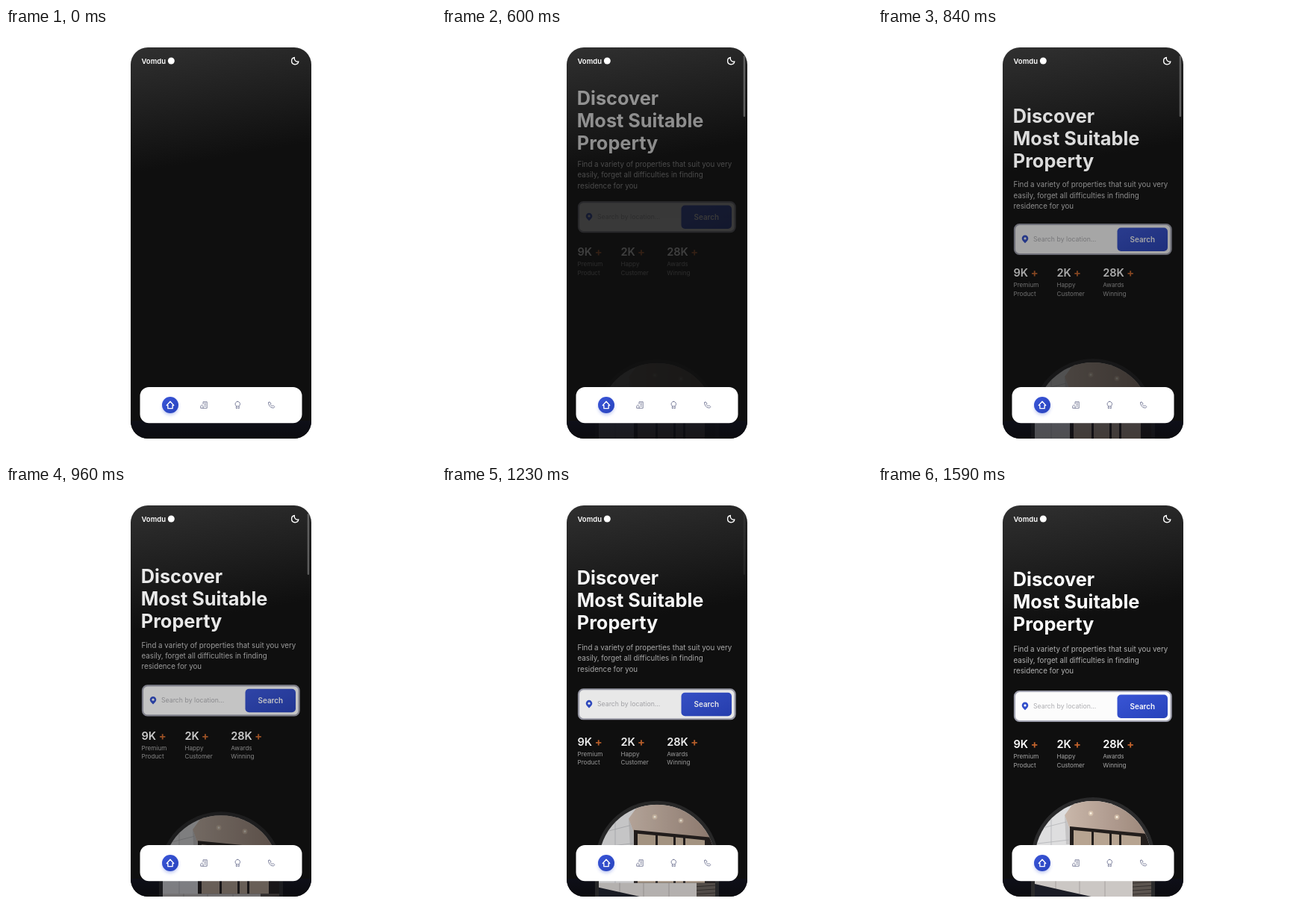
An HTML page for the animation above (1620 ms loop, 576 by 576 pixels).

```html
<!DOCTYPE html>
<html lang="en">
<head>
<meta charset="utf-8">
<title>Property app reveal</title>
<style>
  html, body { margin: 0; width: 100%; height: 100%; overflow: hidden; background: #fff; }
  svg { display: block; width: 100vw; height: 100vh; }
  text { font-family: Inter, "Open Sans", sans-serif; font-optical-sizing: none; }
  .bold { font-weight: 600; fill: #fff; }
  .head { font-size: 25.3px; font-weight: 700; }
  .sub { font-size: 9.75px; fill: #b3b3b3; }
  .num { font-size: 14.6px; }
  .plus { font-size: 14.6px; font-weight: 700; fill: #c4642c; }
  .cap { font-size: 8.15px; fill: #a6a6a6; }
  .icon { fill: none; stroke-width: 2; stroke-linejoin: round; stroke-linecap: round; }
</style>
</head>
<body>
<svg viewBox="0 0 576 576">
  <defs>
    <linearGradient id="back" gradientUnits="userSpaceOnUse" x1="167" y1="26" x2="196" y2="190">
      <stop offset="0" stop-color="#303030"/><stop offset="1" stop-color="#0f0f0f"/>
    </linearGradient>
    <linearGradient id="blue" x1="0" y1="0" x2="1" y2="1">
      <stop offset="0" stop-color="#3a56d8"/><stop offset="1" stop-color="#2843bd"/>
    </linearGradient>
    <linearGradient id="low" x1="0" y1="0" x2="0" y2="1">
      <stop offset="0" stop-color="#0e0f18"/><stop offset="1" stop-color="#0b0b0f"/>
    </linearGradient>
    <linearGradient id="soffit" x1="0" y1="0" x2="1" y2="0">
      <stop offset="0" stop-color="#cdbbae"/><stop offset="1" stop-color="#9c8578"/>
    </linearGradient>
    <filter id="glow" x="-50%" y="-50%" width="200%" height="200%"><feGaussianBlur stdDeviation="2.5"/></filter>
    <clipPath id="screen"><rect x="167" y="26" width="242" height="524" rx="23"/></clipPath>
    <clipPath id="dome"><path d="M210 570V500a78 78 0 0 1 156 0V570z"/></clipPath>
  </defs>

  <g clip-path="url(#screen)">
    <rect x="167" y="26" width="242" height="524" fill="url(#back)"/>
    <rect x="167" y="526" width="242" height="24" fill="url(#low)"/>

    <g id="arch">
      <path d="M205 570V500a83 83 0 0 1 166 0V570z" fill="#2b2b2c"/>
      <g clip-path="url(#dome)">
        <rect x="205" y="415" width="166" height="160" fill="#e3e3e4"/>
        <path d="M250 441L268 416H371V472L257 460z" fill="url(#soffit)"/>
        <path d="M250 441L257 460V480H252z" fill="#c9c8c9"/>
        <path d="M232 430V550M205 462L252 450M205 480L256 474" fill="none" stroke="#b6b8bc" stroke-width=".8"/>
        <path d="M257 456L371 467V575H257z" fill="#241f1d"/>
        <g id="panes" fill="#bba894"></g>
        <circle cx="285" cy="438.500" r="3.4" fill="#f5dfc4" opacity=".45"/>
        <circle cx="320" cy="443.500" r="3.4" fill="#f5dfc4" opacity=".45"/>
        <circle cx="285" cy="438.500" r="1.4" fill="#fff8e8"/>
        <circle cx="320" cy="443.500" r="1.4" fill="#fff8e8"/>
        <path d="M205 527H341V575H205z" fill="#cfcbc8"/>
        <path d="M238 527V546M270 527V550M304 527V550" stroke="#a29e9b" stroke-width=".8"/>
        <path d="M341 527H371V575H341z" fill="#5d5651"/>
        <path d="M341 532L371 530M341 537L371 535M341 542L371 540M341 547L371 545" stroke="#35302d"/>
        <path d="M205 532L290 551V575H205z" fill="#1c1e27"/>
      </g>
    </g>

    <g id="title" class="bold head">
      <text x="180.800" y="134">Discover</text>
      <text x="180.800" y="164">Most Suitable</text>
      <text x="180.800" y="194">Property</text>
    </g>

    <g id="lead" class="sub">
      <text x="181.5" y="222.3">Find a variety of properties that suit you very</text>
      <text x="181.5" y="236.8">easily, forget all difficulties in finding</text>
      <text x="181.5" y="251.2">residence for you</text>
    </g>

    <g id="search">
      <rect x="183" y="275" width="209.6" height="40" rx="6.500" fill="#fff" stroke="#a3a4b2" stroke-width="2.200"/>
      <path d="M197 300.3C194.5 297.6 192.7 296 192.7 293.9a4.3 4.3 0 0 1 8.6 0C201.3 296 199.5 297.6 197 300.3z" fill="#3350cf"/>
      <circle cx="197" cy="293.9" r="1.6" fill="#fff"/>
      <text x="208" y="297.8" font-size="8.75" fill="#b0b0b4">Search by location...</text>
      <rect x="320.5" y="279.5" width="67.5" height="31.5" rx="5" fill="url(#blue)"/>
      <text class="bold" x="354.3" y="298.7" font-size="9.9" text-anchor="middle">Search</text>
    </g>

    <g id="stats"></g>

    <rect id="bar" x="403.7" y="37" width="2.4" height="82" rx="1.2" fill="#6e6e6e"/>

    <text class="bold" x="181.5" y="47.8" font-size="9.5">Vomdu</text>
    <circle cx="221.3" cy="44" r="4.5" fill="#fff"/>
    <path class="icon" stroke="#fff" transform="translate(381.2 37.7) scale(.52)" style="stroke-width:2.6" d="M20.5 14A8.5 8.5 0 0 1 10 3.5 9 9 0 1 0 20.5 14z"/>

    <rect x="179.5" y="481" width="217" height="48.3" rx="12" fill="#fff"/>
    <circle cx="220" cy="508" r="10" fill="#3853d5" opacity=".4" filter="url(#glow)"/>
    <circle cx="220" cy="505" r="11" fill="url(#blue)"/>
    <g id="nav"></g>
  </g>
</svg>
<script>
  const LOOP = 1620, STEP = 30;
  const $ = id => document.getElementById(id);

  // Static repeats
  $('stats').innerHTML = [
    [181.5, '9K', 204.8, 'Premium', 'Product'],
    [239.5, '2K', 262, 'Happy', 'Customer'],
    [301.2, '28K', 333.3, 'Awards', 'Winning']
  ].map(([x, n, px, a, b]) =>
    `<text class="bold num" x="${x}" y="351.2">${n}</text>
     <text class="plus" x="${px}" y="351.2">+</text>
     <text class="cap" x="${x}" y="365.4">${a}</text>
     <text class="cap" x="${x}" y="376.6">${b}</text>`).join('');

  const icons = [
    [220, .52, 2.6, '#fff', 'M3 13L12 3L21 13H18V21H6V13z'],
    [265, .47, 2, '#777b98', 'M10 9V3H21V21H3V15L6.500 12L10 15V21M14 7H17M14 11H17M14 15H17'],
    [310.3, .47, 2, '#777b98', 'M12 2a7 7 0 1 0 .01 0zM8 15V22L12 20L16 22V15'],
    [355.5, .47, 2, '#777b98', 'M4 5L7 3L11 8L9 11Q11 14 14 15L17 13L21 17L19 20C11 22 2 13 4 5z']
  ];
  $('nav').innerHTML = icons.map(([x, s, w, c, d]) =>
    `<path class="icon" stroke="${c}" style="stroke-width:${w}" transform="translate(${x} 505) scale(${s}) translate(-12 -12)" d="${d}"/>`).join('');

  const paneTop = x => 461 + (x - 262) * .097;
  $('panes').innerHTML = [[262, 286], [289, 310], [313, 323], [326, 352]].map(([a, b]) =>
    `<path d="M${a} ${paneTop(a)}L${b} ${paneTop(b)}V527H${a}z"/>`).join('');

  // Smooth monotone curve through a few keys
  function curve(xs, ys, x) {
    const n = xs.length - 1;
    if (x <= xs[0]) return ys[0];
    if (x >= xs[n]) return ys[n];
    const slope = i => (ys[i + 1] - ys[i]) / (xs[i + 1] - xs[i]);
    const tangent = i => {
      if (i === 0) return 0;
      if (i === n) return slope(n - 1);
      const a = slope(i - 1), b = slope(i);
      return a * b <= 0 ? 0 : 2 * a * b / (a + b);
    };
    let i = 0;
    while (x > xs[i + 1]) i++;
    const w = xs[i + 1] - xs[i], u = (x - xs[i]) / w, v = 1 - u;
    return ys[i] * (1 + 2 * u) * v * v + tangent(i) * w * u * v * v
      + ys[i + 1] * u * u * (3 - 2 * u) - tangent(i + 1) * w * u * u * v;
  }

  const times = [210, 450, 690, 840, 1110, 1350, 1590];
  const parts = [
    { id: 'title', dy: [-60, -49, -20, -7, -2.5, -1, 0], op: [0, .22, .68, .85, .95, .98, 1] },
    { id: 'lead', dy: [-60, -52, -25, -9, -3.5, -1.5, 0], op: [0, .1, .55, .78, .92, .97, 1] },
    { id: 'search', dy: [-60, -54, -32, -12, -4.5, -1.5, 0], op: [0, .05, .29, .63, .86, .94, .99] },
    { id: 'stats', dy: [-60, -55, -38, -18, -6, -2, 0], op: [0, .05, .33, .65, .89, .95, 1] },
    { id: 'arch', dy: [28, 27, 26.5, 26, 8, 2.5, 0], op: [0, .01, .13, .31, .77, .92, .98] }
  ];

  function draw(t) {
    for (const p of parts) {
      const el = $(p.id);
      el.setAttribute('transform', `translate(0 ${curve(times, p.dy, t).toFixed(2)})`);
      el.setAttribute('opacity', curve(times, p.op, t).toFixed(3));
    }
    $('bar').setAttribute('opacity', curve([480, 570, 1080, 1260], [0, .8, .8, 0], t).toFixed(3));
  }

  function tick() {
    draw(Math.floor(performance.now() % LOOP / STEP) * STEP);
    requestAnimationFrame(tick);
  }
  tick();
</script>
</body>
</html>
```
